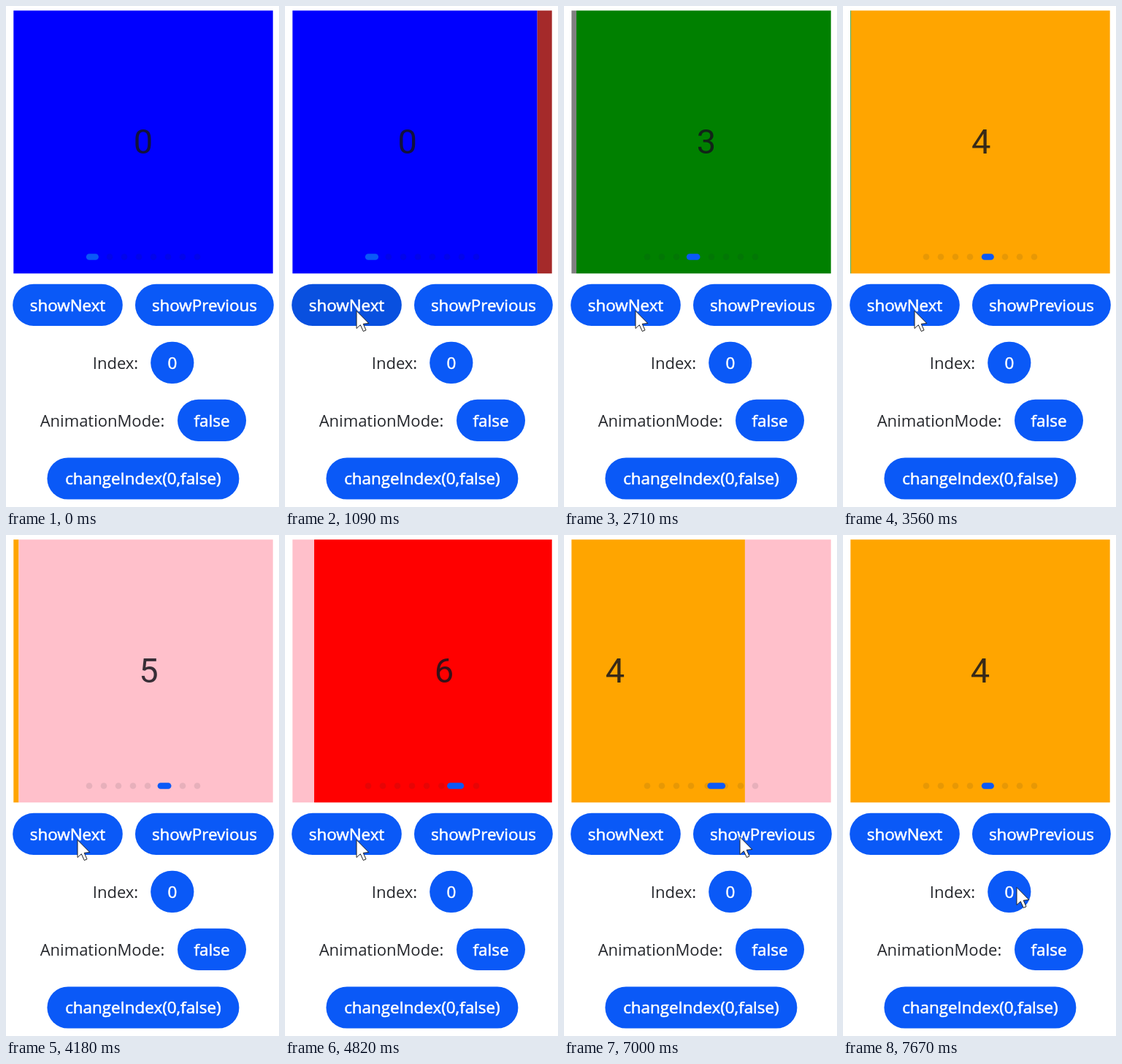
Animation of 374 by 686 pixels, one loop 7.99 s. Source, as an HTML page:

```html
<!DOCTYPE html>
<html lang="en">
<head>
<meta charset="utf-8">
<title>Swiper controller</title>
<style>
  html, body { margin: 0; width: 100%; height: 100%; overflow: hidden; background: #fff; }
  svg { display: block; width: 100%; height: 100%; }
  text { font: 400 22px "Open Sans", "Noto Sans", sans-serif; text-anchor: middle; fill: #25272c; }
  .label { font-size: 22.4px; fill: #fff; stroke: #fff; stroke-width: .55px; }
  .digit { font: 400 47px Roboto, "Open Sans", sans-serif; fill: rgba(20, 20, 28, .85); }
</style>
</head>
<body>
<svg viewBox="0 0 374 686">
  <defs><clipPath id="view"><rect x="10.3" y="6.3" width="355.4" height="359.9"/></clipPath></defs>
  <g id="slides" clip-path="url(#view)"></g>
  <g id="dots" fill="#182431" fill-opacity=".1"></g>
  <rect id="pill" y="339.2" height="8.6" rx="4.3" fill="#0a59f7"/>
  <g id="buttons"></g>
  <text x="150" y="496.5">Index:</text>
  <text x="132" y="575.5">AnimationMode:</text>
  <path id="cursor" d="M0 0V24L5.3 19.2L9.3 28L13 26.3L9.2 17.8L16.8 17Z"
        fill="#fff" stroke="#222" stroke-width="1" stroke-linejoin="round"/>
</svg>
<script>
const LOOP = 7990, WIDTH = 356, BUTTON_HEIGHT = 57.2;
const COLORS = ["#0000ff", "#a52a2a", "#808080", "#008000", "#ffa500", "#ffc0cb", "#ff0000"];
// Label, left edge, vertical centre, width
const BUTTONS = [
  ["showNext", 9.2, 409.4, 150.6],
  ["showPrevious", 177, 409.4, 189.8],
  ["0", 198.2, 488.4, 59.2],
  ["false", 235, 567.4, 94],
  ["changeIndex(0,false)", 56.4, 647, 263]
];
// Start time of each page change and its direction
const TAPS = [[1070, 1], [1772, 1], [2427, 1], [3200, 1], [3900, 1], [4613, 1], [6165, -1], [6880, -1]];
// Pointer stops: time, x, y
const PATH = [
  [70, 204, 664], [330, 142, 520], [600, 79, 399], [850, 98, 417.5],
  [4960, 98, 417.5], [5420, 306, 416], [5500, 306, 416], [5740, 241, 413.5],
  [7400, 241, 413.5], [7670, 238, 482.5]
];

const $ = id => document.getElementById(id);
const clamp = v => Math.max(0, Math.min(1, v));
const mix = (a, b, p) => a + (b - a) * p;

function add(parent, tag, attrs, text) {
  const el = document.createElementNS("http://www.w3.org/2000/svg", tag);
  for (const key in attrs) el.setAttribute(key, attrs[key]);
  if (text) el.textContent = text;
  parent.appendChild(el);
  return el;
}

const slides = COLORS.map((fill, i) => {
  const g = add($("slides"), "g", {});
  add(g, "rect", { x: 10, y: 6, width: WIDTH, height: 361, fill });
  add(g, "text", { x: 188, y: 202, class: "digit" }, String(i));
  return g;
});

const dots = Array.from({ length: 8 }, () => add($("dots"), "circle", { cy: 343.5, r: 4.3 }));

const shades = BUTTONS.map(([label, x, cy, width]) => {
  const box = { x, y: cy - BUTTON_HEIGHT / 2, width, height: BUTTON_HEIGHT, rx: BUTTON_HEIGHT / 2 };
  add($("buttons"), "rect", { ...box, fill: "#0a59f7" });
  const shade = add($("buttons"), "rect", { ...box, fill: "#000", opacity: 0 });
  add($("buttons"), "text", { x: x + width / 2, y: cy + 8.2, class: "label" }, label);
  return shade;
});

// Underdamped spring with stiffness 328 and damping 34
function spring(s) {
  if (s <= 0) return 0;
  const w = Math.sqrt(328 - 17 * 17);
  return 1 - Math.exp(-17 * s) * (Math.cos(w * s) + 17 / w * Math.sin(w * s));
}

const dotX = (i, page) => 118 + 20 * i + 4 * Math.sign(i - page);

function pointer(t) {
  let k = 0;
  while (k < PATH.length - 1 && PATH[k + 1][0] <= t) k++;
  const a = PATH[k], b = PATH[k + 1] || a;
  const p = b === a ? 0 : clamp((t - a[0]) / (b[0] - a[0]));
  const e = p * p * (3 - 2 * p);
  return [mix(a[1], b[1], e), mix(a[2], b[2], e)];
}

function draw(t) {
  let from = 0, to = 0, s = 0;
  const press = [0, 0];
  for (const [start, dir] of TAPS) {
    const d = t - start;
    if (d >= 0) {
      from = to;
      to += dir;
      s = d / 1000;
    }
    const k = dir > 0 ? 0 : 1;
    press[k] = Math.max(press[k], Math.min(clamp((d + 170) / 80), clamp((110 - d) / 90)));
  }

  const dir = to - from, p = spring(s);
  slides.forEach((g, i) => {
    const x = i === to ? dir * (1 - p) * WIDTH : -dir * p * WIDTH;
    g.setAttribute("transform", `translate(${x})`);
    g.style.display = i === to || i === from ? "" : "none";
  });

  dots.forEach((dot, i) => dot.setAttribute("cx", mix(dotX(i, from), dotX(i, to), p)));

  // The trailing end of the pill follows later than the leading one
  const tail = clamp((s - .045) / .265);
  const left = 109.8 + 20 * mix(from, to, dir > 0 ? tail : p);
  const right = 126.9 + 20 * mix(from, to, dir > 0 ? p : tail);
  $("pill").setAttribute("x", left);
  $("pill").setAttribute("width", right - left);

  press.forEach((v, k) => shades[k].setAttribute("opacity", v * .1));

  const [x, y] = pointer(t);
  $("cursor").setAttribute("transform", `translate(${x} ${y})`);
  $("cursor").style.display = t < 70 ? "none" : "";
}

const begin = performance.now();
function tick() {
  draw((performance.now() - begin) % LOOP);
  requestAnimationFrame(tick);
}
tick();
</script>
</body>
</html>
```
